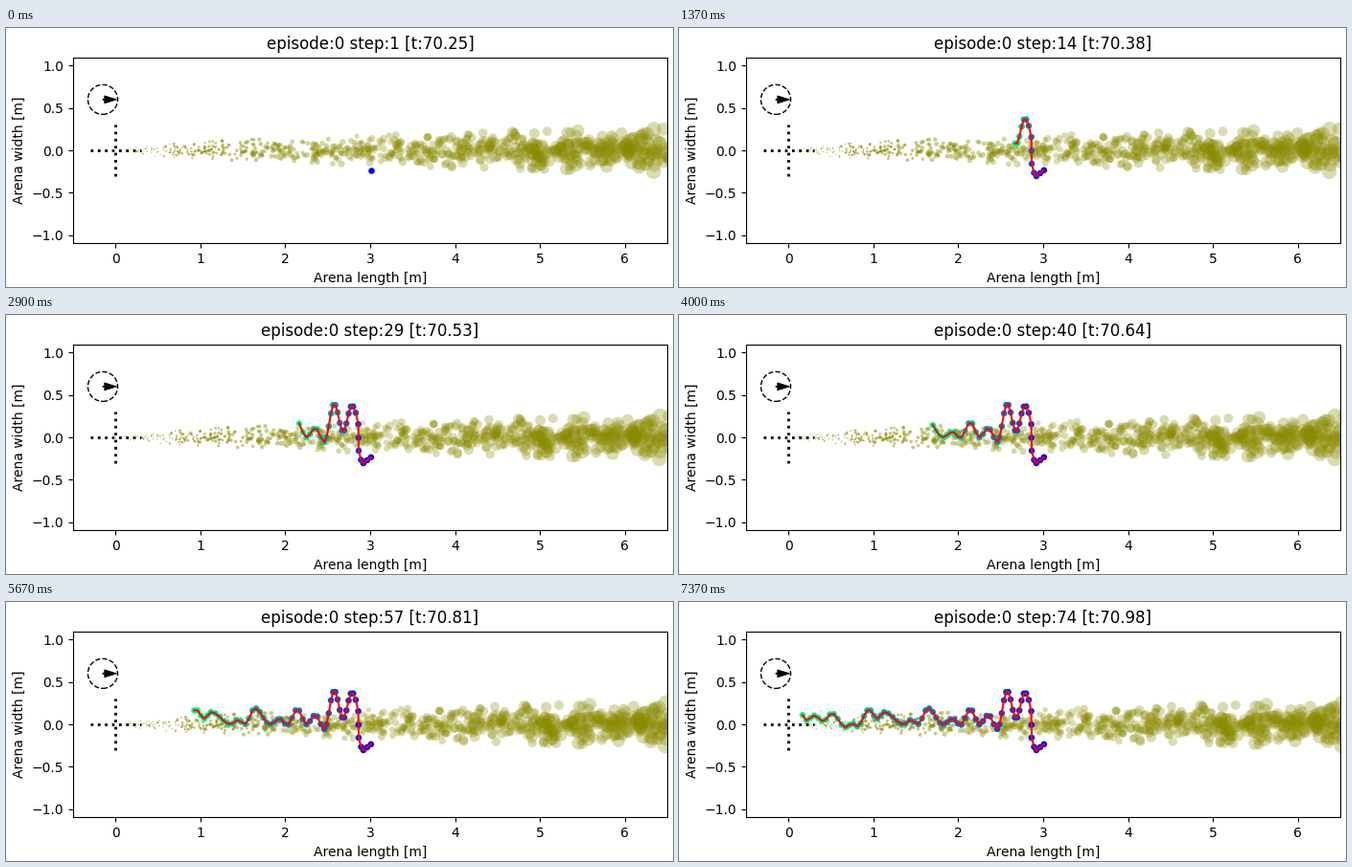
These frames come from a looping animation (696x271 px, 7410 ms). A matplotlib script:

```python
import numpy as np
import matplotlib.pyplot as plt
from matplotlib.animation import FuncAnimation

W, H, DPI = 696, 271, 100
FRAMES, INTERVAL = 247, 30
STEPS = 74
SCALE = 620 / 7     # pixels per metre
Y0 = 128            # stage height of the plume axis
DRIFT = 0.0025      # metres per step

# Upwind progress: (step, x in metres)
ADVANCE = [(1, 3.01), (3, 2.92), (5, 2.865), (7, 2.86), (9.5, 2.785), (22, 2.46),
           (44, 1.53), (52, 1.125), (60, 0.81), (74, 0.165)]

# Turning points of the crosswind zigzag: (step, y in metres)
TURNS = [(1, -.235), (3, -.305), (9.5, .375), (13.5, .07), (17.5, .395),
         (22, -.055), (24.5, .11), (27, 0), (29.5, .18), (32.3, -.01),
         (34.4, .065), (37.2, 0), (41.3, .19), (44.2, 0), (45.7, .055),
         (47.4, 0), (52, .145), (54, .065), (56.5, .175), (60, -.025),
         (61.3, .01), (63, -.035), (66.5, .13), (68.7, .035), (71, .105),
         (73, .045), (74, .11)]


def swing(t, keys):
    """Cosine easing from each turning point to the next."""
    when, y = np.array(keys).T
    k = np.clip(np.searchsorted(when, t, "right") - 1, 0, len(when) - 2)
    u = (t - when[k]) / (when[k + 1] - when[k])
    return y[k] + (y[k + 1] - y[k]) * (1 - np.cos(np.pi * u)) / 2


steps = np.arange(1, STEPS + 1)
path = np.column_stack([np.interp(steps, *zip(*ADVANCE)), swing(steps, TURNS)])

# Puffs: start distance, sideways offset and size relative to the plume
rng = np.random.default_rng(7)
start = rng.uniform(-0.2, 6.6, 820)
side = np.clip(rng.normal(0, 1, start.size), -2.2, 2.2)
girth = rng.uniform(0.82, 1.15, start.size)

fig = plt.figure(figsize=(W / DPI, H / DPI), dpi=DPI, facecolor="white")
plt.rcParams["font.family"] = "DejaVu Sans"
half = 1.1 * SCALE
ax = fig.add_axes([70 / W, (H - Y0 - half) / H, 620 / W, 2 * half / H])
ax.set(xlim=(-0.5, 6.5), ylim=(-1.1, 1.1), xticks=range(7),
       yticks=np.arange(-1, 1.1, 0.5),
       xlabel="Arena length [m]", ylabel="Arena width [m]")
title = ax.set_title("")

puffs = ax.scatter(start, side, linewidths=0, zorder=1)

# Source cross and wind compass
ax.plot([-0.3, 0.3], [0, 0], "k:", lw=2, zorder=2)
ax.plot([0, 0], [-0.3, 0.3], "k:", lw=2, zorder=2)
ax.scatter([-0.15], [0.6], s=500, facecolors="none", edgecolors="k",
           linestyles="--", linewidths=1, zorder=3)
ax.arrow(-0.15, 0.6, 0.02, 0, width=0.015, head_width=0.09, head_length=0.145,
         fc="k", ec="k", lw=0.5, zorder=3)

dots = ax.scatter([0], [0], s=22, c=[0], cmap="winter", linewidths=0, zorder=4)
trail, = ax.plot([], [], color="red", lw=1.5, zorder=5)


def draw_puffs(step):
    x = start + DRIFT * (step - 1)
    seen = x > 0.1
    x = x[seen]
    y = side[seen] * 0.045 * np.sqrt(x)
    radius = (0.25 + 1.05 * x) * girth[seen] * 72 / DPI
    color = np.zeros((x.size, 4))
    color[:, :2] = 0.54
    color[:, 3] = np.clip(0.65 - 0.12 * x, 0.3, 0.6)
    puffs.set_offsets(np.column_stack([x, y]))
    puffs.set_sizes((2 * radius) ** 2)
    puffs.set_facecolors(color)


def update(i):
    # Each step is held for three ticks of the clock
    tick = i * 3 * STEPS // FRAMES
    step = max(1, -(-tick // 3))
    draw_puffs(step)

    walked = path[:step]
    dots.set_offsets(walked)
    dots.set_array(np.arange(step))
    dots.set_clim(0, max(1, step - 1))
    trail.set_data(*walked.T)
    title.set_text(f"episode:0 step:{step} [t:{70.24 + step / 100:.2f}]")
    return puffs, dots, trail, title


anim = FuncAnimation(fig, update, frames=FRAMES, interval=INTERVAL,
                     repeat=True, repeat_delay=0, blit=False)
plt.show()
```
